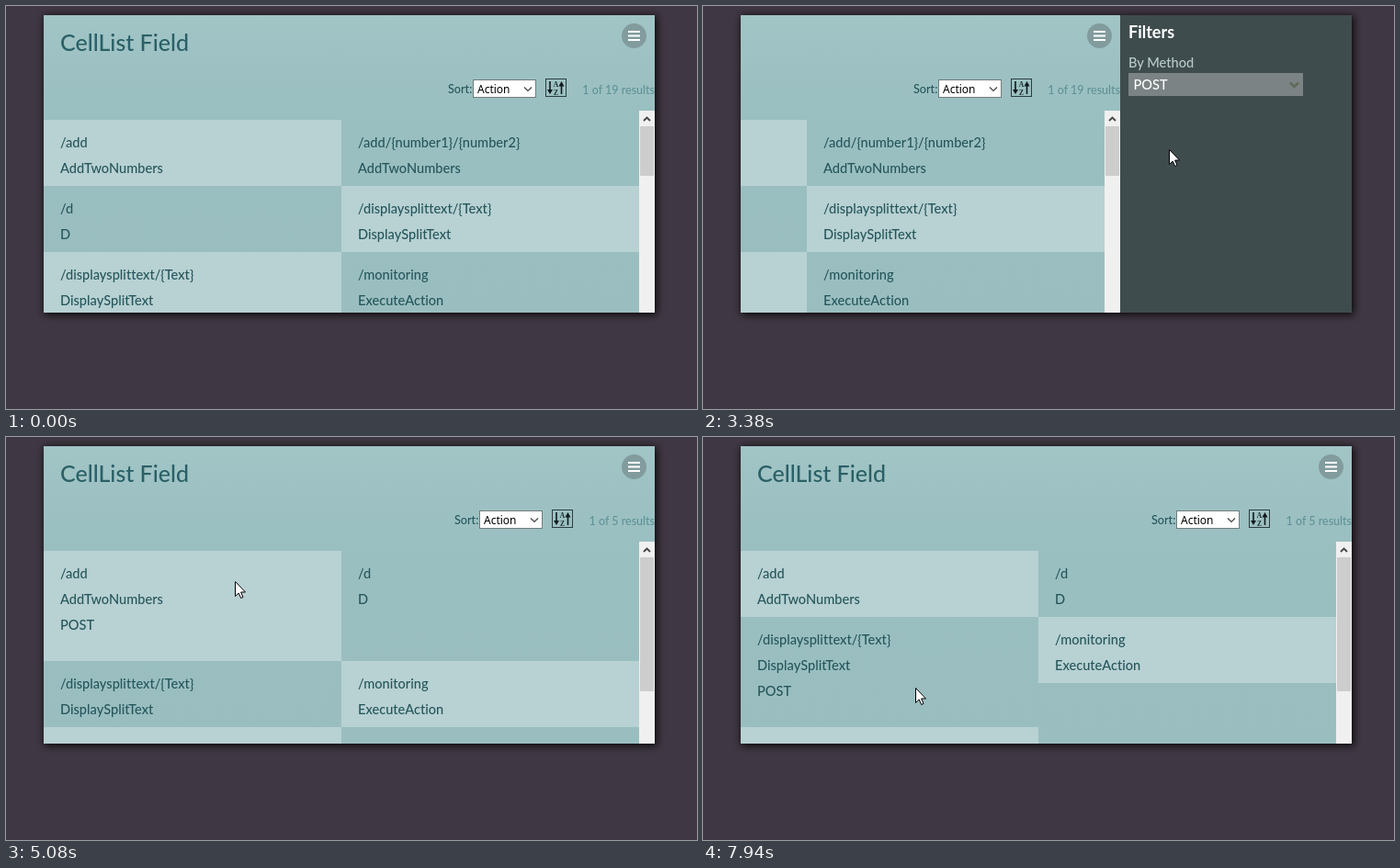
An HTML page that plays this animation: 752x439 px, repeating every 8 s.

```html
<!DOCTYPE html>
<html lang="en">
<head>
<meta charset="utf-8">
<title>CellList Field</title>
<style>
  html, body { margin: 0; width: 100%; height: 100%; overflow: hidden; background: #3f3743; }
  svg { display: block; width: 100vw; height: 100vh; }
  text { font: 500 14.6px Lato, sans-serif; font-variant-ligatures: none; fill: #24565b; white-space: pre; }
  .title { font-size: 25px; fill: #2a6067; }
  .small { font-size: 12.6px; }
  .count { font-size: 12.5px; fill: #5f9297; text-anchor: end; }
  .native { font: 12px "Noto Sans", sans-serif; fill: #000; }
  .filters { font-size: 18px; font-weight: 700; fill: #fff; }
  .label { fill: #b9cccd; }
  .white { fill: #fff; }
  .serif { font: 700 7.5px "Liberation Serif", serif; fill: #1c2a2c; text-anchor: middle; }
</style>
</head>
<body>
<svg viewBox="0 0 752 439">
  <defs>
    <clipPath id="window"><rect x="41" y="10" width="665" height="324"/></clipPath>
    <linearGradient id="teal" x1="0" y1="0" x2="0" y2="1">
      <stop offset="0" stop-color="#a1c4c5"/>
      <stop offset=".35" stop-color="#9abfc1"/>
      <stop offset="1" stop-color="#9abec0"/>
    </linearGradient>
    <filter id="blur" x="-10%" y="-10%" width="120%" height="120%">
      <feGaussianBlur stdDeviation="4.5"/>
    </filter>
  </defs>
  <rect width="752" height="439" fill="#3f3743"/>
  <rect x="42" y="11" width="666" height="325" fill="#000" opacity=".9" filter="url(#blur)"/>
  <g id="stage" clip-path="url(#window)"></g>
  <g id="pointer"></g>
</svg>
<script>
const LOOP = 8000, DRAWER = 252, SLIDE = 500, TRAVEL = 440;
const REFRESH = 77.2, FIRST_REFRESH = 437;
const CELL = { width: 324, height: 72, open: 120, top: 124 };
const stage = document.getElementById('stage');
const pointer = document.getElementById('pointer');

// Where the cursor rests, and when it gets there
const STOPS = [
  { at: 0, x: 752, y: 8 },
  { at: 910, x: 690, y: 32 },
  { at: 1900, x: 521, y: 82 },
  { at: 2750, x: 507, y: 156 },
  { at: 4145, x: 424, y: 28 },
  { at: 5075, x: 249, y: 157 },
  { at: 6010, x: 408, y: 73 },
  { at: 6390, x: 440, y: 159 },
  { at: 7390, x: 231, y: 273 }
];
const CLICK = { menu: 1205, select: 2130, option: 2985, close: 4370 };
const OPENING = 1267, CLOSING = 4339;
const PICKED = 3060, CLEARED = 3440, FILTERED = 3595;

const METHODS = ['--Select--', 'GET', 'POST', 'PUT', 'PATCH', 'DELETE', 'OPTION', 'UPDATE', 'HEAD', 'UNKNOWN'];
const ADD = ['/add', 'AddTwoNumbers'], D = ['/d', 'D'];
const SPLIT = ['/displaysplittext/{Text}', 'DisplaySplitText'];
const MONITOR = ['/monitoring', 'ExecuteAction'];
const ALL = [ADD, ['/add/{number1}/{number2}', 'AddTwoNumbers'], D, SPLIT, SPLIT, MONITOR];
const POSTS = [ADD, D, SPLIT, MONITOR, ['/details', 'GetDetails']];

const clamp = (v, low, high) => Math.min(high, Math.max(low, v));
const text = (x, y, s, cls = '') => `<text x="${x}" y="${y}" class="${cls}">${s}</text>`;
const rect = (x, y, w, h, fill, extra = '') =>
  `<rect x="${x}" y="${y}" width="${w}" height="${h}" fill="${fill}" ${extra}/>`;
const line = (d, color, width) =>
  `<path d="${d}" fill="none" stroke="${color}" stroke-width="${width}"/>`;

const refreshTime = t => t < FIRST_REFRESH ? 0
  : FIRST_REFRESH + Math.floor((t - FIRST_REFRESH) / REFRESH) * REFRESH;

// CSS "ease": cubic-bezier(.25, .1, .25, 1)
function ease(p) {
  if (p <= 0 || p >= 1) return clamp(p, 0, 1);
  const bezier = (s, a, b) => 3 * s * (1 - s) ** 2 * a + 3 * s * s * (1 - s) * b + s ** 3;
  let low = 0, high = 1;
  for (let i = 0; i < 20; i++) {
    const mid = (low + high) / 2;
    if (bezier(mid, .25, .25) < p) low = mid; else high = mid;
  }
  return bezier(low, .1, 1);
}

function cursorAt(t) {
  let { x, y, at } = STOPS[0];
  for (const stop of STOPS.slice(1)) {
    const start = Math.max(at, stop.at - TRAVEL);
    const p = clamp((t - start) / (stop.at - start), 0, 1), s = p * p * (3 - 2 * p);
    x += (stop.x - x) * s;
    y += (stop.y - y) * s;
    at = stop.at;
  }
  return { x: Math.round(x), y: Math.round(y) };
}

function hoveredCell({ x, y }) {
  if (y < CELL.top) return -1;
  const row = clamp(Math.floor((y - CELL.top) / CELL.height), 0, 1);
  return row * 2 + (x < 41 + CELL.width ? 0 : 1);
}

function list(items, hovered) {
  let out = '', top = CELL.top;
  for (let row = 0; row < 3; row++) {
    for (let col = 0; col < 2; col++) {
      const i = row * 2 + col, x = 41 + col * CELL.width;
      if (!items[i]) continue;
      const open = i === hovered, lines = open ? [...items[i], 'POST'] : items[i];
      if ((row + col) % 2 === 0) out += rect(x, top, CELL.width, open ? CELL.open : CELL.height, '#b8d1d3');
      out += lines.map((s, n) => text(x + 18, top + 30 + n * 28, s)).join('');
    }
    top += hovered >= 0 && hovered >> 1 === row ? CELL.open : CELL.height;
  }
  return out;
}

function scrollbar(thumb) {
  return rect(689, 114, 17, 220, '#f0f0f0') + rect(690, 131, 15, thumb, '#cdcdcd') +
    line('M694 125l3.5-3.5 3.5 3.5', '#444', 1.8);
}

function toolbar(filtered) {
  return `<g transform="translate(${filtered ? 7 : 0})">` + text(481, 95, 'Sort:', 'small') +
    rect(508.5, 80.5, 68, 19, '#fff', 'stroke="#707c7c"') + text(513, 95, 'Action', 'native') +
    line('M564 88.5l4 4 4-4', '#444', 1.2) +
    rect(587.5, 79.5, 22, 19, 'none', 'stroke="#2b3d40"') +
    line('M592 82v11M604.5 96V86', '#101a1c', 1.6) +
    '<path d="M589 91h6l-3 5zM601.5 87.5h6l-3-5.5z" fill="#101a1c"/>' +
    text(598.5, 88, 'A', 'serif') + text(598.5, 96.5, 'Z', 'serif') + '</g>' +
    text(706, 96, `1 of ${filtered ? 5 : 19} results`, 'count');
}

function mainPage(t, hovered) {
  const filtered = t >= FILTERED, loading = t >= CLEARED && !filtered;
  const thumb = !filtered ? 54 : hovered >= 0 ? 146 : 178;
  return rect(41, 10, 665, 324, 'url(#teal)') + text(59, 49, 'CellList Field', 'title') +
    '<circle cx="683.5" cy="32.5" r="13.5" fill="#829c9e"/>' +
    line('M677 28h13M677 32.5h13M677 37h13', '#fff', 2.2) + toolbar(filtered) +
    (loading ? '' : list(filtered ? POSTS : ALL, hovered) + scrollbar(thumb));
}

function options(y) {
  const active = clamp(Math.floor((y - 105) / 22), 0, METHODS.length - 1);
  return rect(715.5, 104.5, 189, 221, '#fff', 'stroke="#829296"') +
    rect(716, 105 + active * 22, 188, 22, '#3399ff') +
    METHODS.map((s, i) => `<g${i === active ? ' filter="invert(1)"' : ''}>${text(722, 120.5 + i * 22, s, 'native')}</g>`).join('');
}

function drawer(t, y) {
  return rect(706, 10, DRAWER, 324, '#3f4c4d') + text(715, 35, 'Filters', 'filters') +
    text(715, 67, 'By Method', 'label') + rect(715, 73, 190, 25, '#7b8384') +
    text(720.5, 90.5, t >= PICKED ? 'POST' : '--Select--', 'white') +
    line('M891 83.5l4.5 4.5 4.5-4.5', '#626a58', 2.6) +
    (t >= CLICK.select && t < PICKED ? options(y) : '');
}

function cursor(t, { x, y }, shift) {
  if (t === 0) return '';
  const pressed = Object.values(CLICK).some(at => t >= at && t < at + 150);
  const ring = pressed ? `<circle cx="${x}" cy="${y}" r="12" fill="#cfc01c" opacity=".88"/>` : '';
  const onMenu = Math.hypot(x - 683.5 + shift, y - 32.5) < 14;
  const onSelect = x > 715 - shift && x < 905 - shift && y > 73 && y < 98;
  const shape = onMenu || onSelect
    ? 'M2 1.5Q2 .5 3.5 .5T5 2V8Q7 6.5 8 8.5Q10 7.5 10.5 9.5Q13 9 13 11.5V16Q13 18 11.5 19.5V22.5H2.5V20L-2.5 13.5Q-4 11-2 10.5Q-.5 10.5 2 13.5Z'
    : 'M.5 .5V16.5L4.2 13L6.7 18.5L9 17.5L6.6 12H11.5Z';
  return `${ring}<path transform="translate(${x} ${y})" d="${shape}" fill="#fff" stroke="#000" stroke-linejoin="round"/>`;
}

let drawn = -1;
function render(now) {
  const t = refreshTime(now % LOOP);
  if (t === drawn) return;
  drawn = t;
  const at = cursorAt(t);
  const shift = Math.round(DRAWER * (ease((t - OPENING) / SLIDE) - ease((t - CLOSING) / SLIDE)));
  const hovered = t > CLOSING && shift === 0 ? hoveredCell(at) : -1;
  stage.innerHTML = `<g transform="translate(${-shift})">${mainPage(t, hovered)}${drawer(t, at.y)}</g>`;
  pointer.innerHTML = cursor(t, at, shift);
}

const began = performance.now();
function tick() {
  render(performance.now() - began);
  requestAnimationFrame(tick);
}
tick();
</script>
</body>
</html>
```
